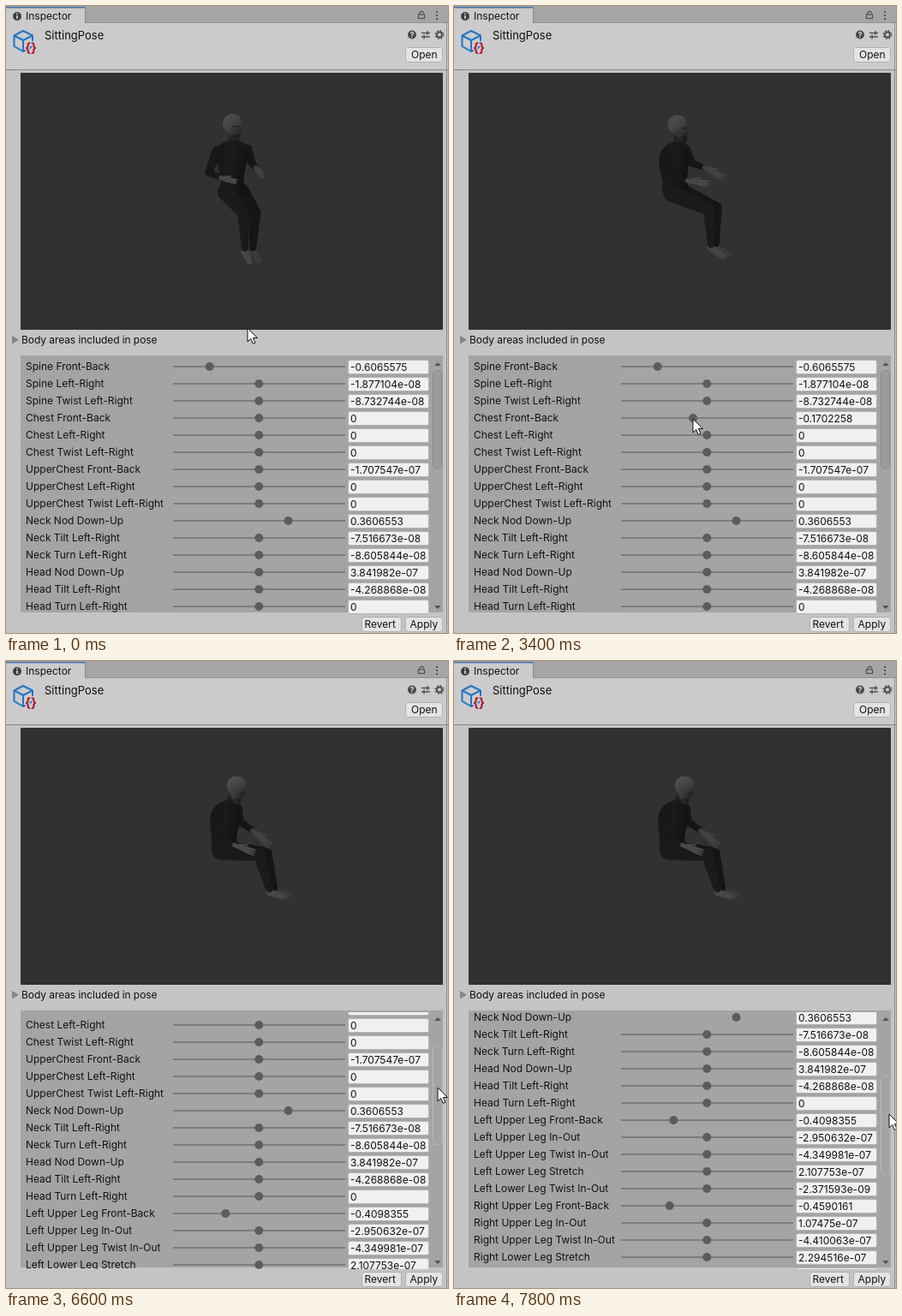
An HTML page that plays this animation: 516x732 px, repeating every 8000 ms.

```html
<!DOCTYPE html>
<html lang="en">
<head>
<meta charset="utf-8">
<title>Pose inspector</title>
<style>
html, body { margin: 0; width: 100%; height: 100%; overflow: hidden; background: #c4c4c4; }
svg { display: block; width: 516px; height: 732px; }
text { font: 12px Inter, "Open Sans", sans-serif; fill: #111; white-space: pre; }
.title { font-size: 13px; }
.button { fill: #e4e4e4; stroke: #b0b0b0; }
.field { fill: #f0f0f0; stroke: #b4b4b4; }
.track { stroke: #7d7d7d; stroke-width: 2; }
.knob { fill: #5c5c5c; }
.thumb { fill: #9b9b9b; stroke: #8b8b8b; }
.thumb.held { fill: #a4a4a4; stroke: #bababa; }
.ink { fill: none; stroke: #131313; stroke-opacity: .6; stroke-width: 1.5; stroke-linecap: round; }
</style>
</head>
<body>
<svg viewBox="0 0 516 732">
  <defs>
    <clipPath id="listClip"><rect x="17" y="410" width="480" height="300"/></clipPath>
    <linearGradient id="skin" x1=".2" y1="0" x2=".8" y2="1">
      <stop offset="0" stop-color="#525252"/><stop offset=".45" stop-color="#404040"/><stop offset="1" stop-color="#181818"/>
    </linearGradient>
    <linearGradient id="shirt" x1="0" y1="0" x2="1" y2=".4">
      <stop offset="0" stop-color="#151514"/><stop offset=".5" stop-color="#1b1b1a"/><stop offset="1" stop-color="#111"/>
    </linearGradient>
  </defs>

  <rect width="516" height="732" fill="#c4c4c4"/>
  <rect width="516" height="20" fill="#a5a5a5"/>
  <rect y="20" width="516" height="54" fill="#cbcbcb"/>
  <path d="M92 19.5H516" stroke="#8f8f8f"/>
  <rect y="1" width="92" height="19" fill="#cbcbcb"/>
  <rect y="1" width="92" height="1.5" fill="#4472ae"/>
  <path d="M92.5 1V19" stroke="#8a8a8a"/>
  <path d="M0 74.5H516" stroke="#858585"/>
  <path d="M514.5 20V732" stroke="#8c8c8c"/>

  <circle cx="13" cy="12" r="5" fill="#3d3d3d"/>
  <path d="M13 8.5v1.6M13 11v4" stroke="#e0e0e0" stroke-width="1.6"/>
  <text x="23" y="16">Inspector</text>
  <g fill="none" stroke="#505050" stroke-width="1.2">
    <rect x="481.5" y="10" width="7" height="4.5"/>
    <path d="M483 10V8.5a2.2 2.2 0 0 1 4.4 0"/>
  </g>
  <path d="M503 6v2m0 2v2m0 2v2" stroke="#505050" stroke-width="2"/>

  <path d="M20 29 31 34.5V47L20 53 9.5 47V34.5ZM9.5 34.5 20 40 31 34.5M20 40V53"
    fill="none" stroke="#2474c6" stroke-width="2" stroke-linejoin="round"/>
  <text x="22" y="54" style="font-size:15px;font-weight:700;fill:#b2162c;stroke:#cbcbcb;stroke-width:3;paint-order:stroke">{}</text>
  <text class="title" x="45" y="39">SittingPose</text>
  <circle cx="474" cy="33.5" r="5" fill="#484848"/>
  <text x="471.5" y="37" style="font-size:9px;font-weight:700;fill:#ddd">?</text>
  <path d="M485 31.5h10M485 36h10M492 29v5M488 33.5v5" stroke="#505050" stroke-width="1.4"/>
  <g fill="none" stroke="#505050" stroke-width="1.8">
    <circle cx="506" cy="33.5" r="3"/>
    <circle cx="506" cy="33.5" r="4.6" stroke-dasharray="1.8 1.81"/>
  </g>
  <rect class="button" x="466.5" y="48.5" width="43" height="17" rx="3"/>
  <text x="473" y="61">Open</text>

  <rect x="17" y="78" width="493" height="300" fill="#313131"/>
  <g id="figure"></g>

  <path d="M7 385V394.5L15 389.7Z" fill="#858585"/>
  <text x="18" y="394" letter-spacing="-.07">Body areas included in pose</text>

  <rect x="17" y="408" width="493" height="300" fill="#a4a4a4"/>
  <g clip-path="url(#listClip)"><g id="list"></g></g>
  <path d="M500 420h8l-4-4ZM500 700h8l-4 4Z" fill="#555"/>
  <rect id="thumb" class="thumb" x="498.5" y="425.5" width="10.5" height="115" rx="5"/>

  <rect class="button" x="415.5" y="713.5" width="46" height="17" rx="3"/>
  <text x="418.5" y="726">Revert</text>
  <rect class="button" x="466.5" y="713.5" width="43" height="17" rx="3"/>
  <text x="471.5" y="726">Apply</text>

  <path id="cursor" d="M0 0V16l3.7-3.5 2.6 5.9 2.7-1.2-2.6-5.7h5Z" fill="#fff" stroke="#111"/>
</svg>
<script>
const LOOP = 8000, STEP = 200, CHEST = 3, CHEST_END = -0.8586388;
const $ = id => document.getElementById(id);
const mix = (a, b, k) => a + (b - a) * k;
const ramp = (t, from, to) => Math.min(1, Math.max(0, (t - from) / (to - from)));
const smooth = k => k * k * (3 - 2 * k);
const knobX = v => 295.3 + 95 * v;

function add(parent, tag, attrs) {
  const el = document.createElementNS("http://www.w3.org/2000/svg", tag);
  for (const k in attrs) el.setAttribute(k, attrs[k]);
  return parent.appendChild(el);
}

// Slider list: every body part has the same set of axes as its group
const cross = (bones, axes) => bones.flatMap(bone => axes.map(axis => `${bone} ${axis}`));
const names = [
  ...cross(["Spine", "Chest", "UpperChest"], ["Front-Back", "Left-Right", "Twist Left-Right"]),
  ...cross(["Neck", "Head"], ["Nod Down-Up", "Tilt Left-Right", "Turn Left-Right"]),
  ...cross(["Left", "Right"], ["Upper Leg Front-Back", "Upper Leg In-Out", "Upper Leg Twist In-Out",
    "Lower Leg Stretch", "Lower Leg Twist In-Out"])
];
const values = `-0.6065575 -1.877104e-08 -8.732744e-08 0 0 0 -1.707547e-07 0 0
  0.3606553 -7.516673e-08 -8.605844e-08 3.841982e-07 -4.268868e-08 0
  -0.4098355 -2.950632e-07 -4.349981e-07 2.107753e-07 -2.371593e-09
  -0.4590161 1.07475e-07 -4.410063e-07 2.294516e-07 0`.split(/\s+/);

const rows = names.map((name, i) => {
  const y = 421 + i * 20, list = $("list");
  add(list, "text", { x: 23, y: y + 4 }).textContent = name;
  const track = add(list, "path", { class: "track", d: `M195 ${y}H396` });
  const knob = add(list, "circle", { class: "knob", cy: y, r: 5 });
  add(list, "rect", { class: "field", x: 399.5, y: y - 7.5, width: 94, height: 16, rx: 2 });
  const text = add(list, "text", { x: 402, y: y + 5 });
  const row = { y, track, set(v, shown) { knob.setAttribute("cx", knobX(v)); text.textContent = shown; } };
  row.set(+values[i], values[i]);
  return row;
});

// Skeleton joints as [forward, down, side]; side < 0 is nearest the camera once turned
const HIP = [-10, 218, 0], NECK = [-9, 162, 0], BALANCE = [0, 237, 0];
const ARMS = {
  near: [[-11, 170, -20], [8, 191, -38], [28, 195, -31], [52, 197, -20]],
  far: [[-11, 170, 18], [-4, 185, 21], [18, 187, 17], [48, 195, 15]]
};
const legJoints = sign => [[-10, 218, 9 * sign], [40, 236, 7 * sign], [39, 277, 5 * sign], [38, 281, 5 * sign], [55, 290, 6 * sign]];
// Torso cross-sections: forward, down, half width, half depth
const RINGS = [[-9, 159, 7, 6], [-12, 165, 17, 11], [-14, 175, 19, 16], [-14, 190, 16, 17],
  [-13, 205, 13, 15], [-10, 217, 16, 16], [-9, 225, 10, 10]];

// Positive angles tip forward
function rotate([f, y, s], [pf, py], degrees) {
  const a = degrees * Math.PI / 180, c = Math.cos(a), n = Math.sin(a);
  return [pf + (f - pf) * c - (y - py) * n, py + (f - pf) * n + (y - py) * c, s];
}

function buildPose(turn, bend) {
  const yaw = mix(22, 55, turn) * Math.PI / 180, c = Math.cos(yaw), n = Math.sin(yaw);
  const project = ([f, y, s]) => [269 + f * n + s * c, y + .15 * (f * c - s * n)];
  const lower = p => rotate(p, BALANCE, -20 * bend);
  const hip = lower(HIP);
  const upper = p => rotate(p, HIP, 6 * bend).map((v, i) => v + hip[i] - HIP[i]);
  const head = (f, y, s = 0) => project(upper(rotate([f, y, s], NECK, 25 * bend)));
  const armAt = joints => joints.map(p => project(upper(rotate(p, joints[0], 10 * bend))));
  const legAt = sign => legJoints(sign).map(p => project(lower(p)));

  const rings = RINGS.map(([f, y, w, d]) => [project(upper([f, y, 0])), Math.hypot(w * c, d * n)]);
  const edge = sign => rings.map(([[x, y], r]) => [x + sign * r, y]);
  return {
    torso: [...edge(-1), ...edge(1).reverse()],
    neck: project(upper(NECK)), skull: head(-12, 139), face: head(-7, 144), chin: head(-2, 154),
    lines: [141, 152].map(y => [head(-2, y, -4), head(-2, y, 4)]),
    nearArm: armAt(ARMS.near), farArm: armAt(ARMS.far), nearLeg: legAt(-1), farLeg: legAt(1)
  };
}

// Closed smooth curve through all points
function outline(p) {
  const n = p.length, at = i => p[(i + n) % n];
  let d = "M" + p[0];
  for (let i = 0; i < n; i++) {
    const [a, b, c, e] = [at(i - 1), at(i), at(i + 1), at(i + 2)];
    d += `C${b.map((v, j) => v + (c[j] - a[j]) / 6)} ${c.map((v, j) => v - (e[j] - b[j]) / 6)} ${c}`;
  }
  return d + "Z";
}

// Tapered round-ended limb
function limb(a, b, ra, rb) {
  const dx = b[0] - a[0], dy = b[1] - a[1], len = Math.hypot(dx, dy) || 1;
  const nx = -dy / len, ny = dx / len;
  const pt = (p, r) => `${p[0] + nx * r} ${p[1] + ny * r}`;
  return `M${pt(a, ra)}A${ra} ${ra} 0 0 1 ${pt(a, -ra)}L${pt(b, -rb)}A${rb} ${rb} 0 0 1 ${pt(b, rb)}Z`;
}

function hand([, , wrist, tip]) {
  const dx = tip[0] - wrist[0], dy = tip[1] - wrist[1];
  const along = (k, s) => [wrist[0] + dx * k - dy * s, wrist[1] + dy * k + dx * s];
  const fingers = [-1, 0, 1].map(i => limb(along(.5, i * .08), along(.95, i * .12), 1.6, .9));
  return limb(wrist, along(.5, 0), 2.6, 3.3) + fingers.join("") + limb(along(.2, -.08), along(.55, -.22), 1.5, .9);
}

const arm = ([s, e, w]) => limb(s, e, 6, 4.5) + limb(e, w, 4.5, 3.2);
const leg = ([h, k, a]) => limb(h, k, 10, 7) + limb(k, a, 7, 4);
const foot = ([, , a, heel, toe]) => limb(a, heel, 3.6, 4.2) + limb(heel, toe, 4.2, 3.5);
const headShape = p => limb(p.skull, p.face, 11.5, 9.5) + limb(p.face, p.chin, 9.5, 4.5);

const parts = [
  ["#3a3a3a", p => foot(p.farLeg)],
  ["#151514", p => leg(p.farLeg)],
  ["#161615", p => arm(p.farArm)],
  ["#414141", p => hand(p.farArm)],
  ["#222", p => limb(p.skull, p.neck, 5, 5.5)],
  ["url(#shirt)", p => outline(p.torso)],
  ["#464646", p => foot(p.nearLeg)],
  ["#1a1a18", p => leg(p.nearLeg)],
  ["url(#skin)", headShape],
  ["", p => p.lines.map(([a, b]) => `M${a}L${b}`).join("")],
  ["#181817", p => arm(p.nearArm)],
  ["#474747", p => hand(p.nearArm)]
].map(([fill, draw]) => ({ draw, el: add($("figure"), "path", fill ? { fill } : { class: "ink" }) }));

// Pointer stops: ms, x, y
const pointer = [[0, 282, 376], [700, 224, 313], [1600, 286, 313], [1800, 286, 313], [2400, 267, 439],
  [3000, 295, 481], [5000, 213, 482], [6000, 504, 471], [6600, 504, 471], [7800, 508, 471]];

function pointerAt(t) {
  const i = Math.max(1, pointer.findIndex(k => k[0] >= t));
  const [a, b] = t > 7800 ? pointer.slice(-2) : [pointer[i - 1], pointer[i]];
  const k = smooth(ramp(t, a[0], b[0]));
  return [mix(a[1], b[1], k), mix(a[2], b[2], k)];
}

function render(t) {
  const turn = ramp(t, 600, 1600), bend = smooth(ramp(t, 3000, 4400));
  const offset = Math.round(185 * ramp(t, 6000, 7800) ** .81);
  const pose = buildPose(turn, bend);
  for (const { el, draw } of parts) el.setAttribute("d", draw(pose));

  const chest = bend * CHEST_END;
  rows[CHEST].set(chest, chest ? chest.toPrecision(7) : "0");

  // The pointer holds the knob, then the scrollbar thumb.
  let [x, y] = pointerAt(t);
  if (t > 3000 && t <= 5000) [x, y] = [knobX(chest), 482];
  if (offset) y = 476 + offset / 3.5;
  $("cursor").setAttribute("transform", `translate(${Math.round(x)} ${Math.round(y)})`);

  $("list").setAttribute("transform", `translate(0 ${-offset})`);
  for (const row of rows) row.track.style.visibility = row.y - offset < 417 ? "hidden" : "";
  $("thumb").setAttribute("y", 425.5 + Math.round(offset / 3.12));
  $("thumb").classList.toggle("held", offset > 0);
}

let shown = -1;
const start = performance.now();
function tick() {
  const t = Math.floor((performance.now() - start) % LOOP / STEP) * STEP;
  if (t !== shown) render(shown = t);
  requestAnimationFrame(tick);
}
tick();
</script>
</body>
</html>
```
